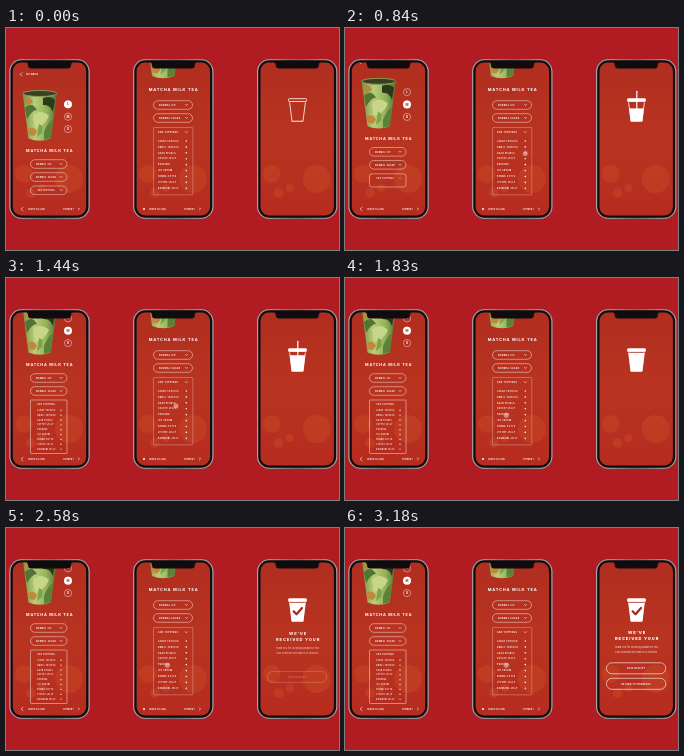
An HTML page for the animation above (3.6 s loop, 333 px wide and 222 px high).

```html
<!DOCTYPE html>
<html lang="en">
<head>
<meta charset="utf-8">
<title>Tea ordering app</title>
<style>
html, body { margin: 0; width: 100%; height: 100%; overflow: hidden; background: #b11c22; }
svg { display: block; width: 100vw; height: 100vh; font-family: Inter, "Open Sans", sans-serif; }
text { fill: #fff; }
.line { fill: none; stroke: #fff; stroke-width: .5; stroke-opacity: .85; }
.thin { stroke-width: .4; stroke-opacity: .65; }
.mark { fill: none; stroke: #fff; stroke-width: .6; stroke-linecap: round; stroke-linejoin: round; }
.anim, .anim * { animation-duration: 3600ms; animation-iteration-count: infinite; animation-timing-function: linear; }

.scroll { animation-name: scroll; }
@keyframes scroll {
  0%, 19.2% { transform: none; animation-timing-function: ease-in-out; }
  29.5%, 100% { transform: translateY(-36px); }
}
.off { animation-name: off; }
@keyframes off { 0%, 8.3% { opacity: 1; } 11.7%, 100% { opacity: 0; } }
.on { animation-name: on; }
@keyframes on { 0%, 8.3% { opacity: 0; } 11.7%, 100% { opacity: 1; } }

.panel { animation-name: panel; }
@keyframes panel {
  0%, 22% { height: 8.6px; rx: 4.3px; }
  24.5% { height: 17px; rx: .6px; }
  30.8% { height: 43px; rx: .6px; }
  34.2%, 100% { height: 53.5px; rx: .6px; }
}
.arrow { animation-name: arrow; }
@keyframes arrow { 0%, 22% { opacity: 1; } 25%, 100% { opacity: 0; } }
.items { animation-name: items; }
@keyframes items { 0%, 32.5% { opacity: 0; } 39%, 100% { opacity: 1; } }

.touch { animation-name: touch; }
@keyframes touch {
  0%, 13% { transform: translate(180.3px, 125.5px); opacity: 0; }
  16.7%, 33.3% { transform: translate(180.3px, 125.5px); opacity: 1; animation-timing-function: ease-in; }
  40% { transform: translate(170px, 128px); opacity: 1; animation-timing-function: ease-out; }
  50%, 100% { transform: translate(161.3px, 137.3px); opacity: 1; }
}

.straw { animation-name: straw; }
@keyframes straw {
  0%, 2.5% { transform: translateY(-26px); opacity: 0; animation-timing-function: ease-out; }
  5% { opacity: 1; }
  14%, 47.5% { transform: none; opacity: 1; animation-timing-function: ease-in; }
  50.8%, 100% { transform: translateY(10px); opacity: 0; }
}
.lid { animation-name: lid; }
@keyframes lid { 0%, 4% { fill-opacity: 0; } 12%, 100% { fill-opacity: 1; } }
.drink { animation-name: drink; }
@keyframes drink {
  0%, 12.5% { transform: translateY(19px); }
  26%, 47.5% { transform: translateY(2.5px); }
  50.8%, 100% { transform: none; }
}
.check { stroke-dasharray: 16; animation-name: check; }
@keyframes check {
  0%, 55% { stroke-dashoffset: 16; opacity: 0; }
  55.1% { stroke-dashoffset: 16; opacity: 1; animation-timing-function: ease-out; }
  61%, 100% { stroke-dashoffset: 0; opacity: 1; }
}
.rise { animation-name: rise; }
@keyframes rise {
  0%, 59% { transform: translateY(12px); opacity: 0; animation-timing-function: ease-out; }
  76%, 100% { transform: none; opacity: 1; }
}
.save { animation-name: save; }
@keyframes save {
  0%, 69% { transform: translateY(13px); opacity: 0; animation-timing-function: ease-out; }
  81%, 100% { transform: none; opacity: 1; }
}
.home { animation-name: home; }
@keyframes home {
  0%, 77% { transform: translateY(13px); opacity: 0; animation-timing-function: ease-out; }
  88.3%, 100% { transform: none; opacity: 1; }
}
</style>
</head>
<body>
<svg id="stage" class="anim" viewBox="0 0 333 222" preserveAspectRatio="none">
  <defs>
    <linearGradient id="glow" x2="0" y2="1">
      <stop offset="0" stop-color="#b02e20"/>
      <stop offset=".5" stop-color="#b93420"/>
      <stop offset="1" stop-color="#b62c20"/>
    </linearGradient>
    <linearGradient id="metal">
      <stop offset="0" stop-color="#a9a3a4"/>
      <stop offset=".5" stop-color="#6f696b"/>
      <stop offset="1" stop-color="#a9a3a4"/>
    </linearGradient>
    <linearGradient id="leaf">
      <stop offset="0" stop-color="#6f9443"/>
      <stop offset=".35" stop-color="#b9cc78"/>
      <stop offset=".7" stop-color="#93b358"/>
      <stop offset="1" stop-color="#4f7034"/>
    </linearGradient>
    <clipPath id="screen"><rect x="6.800" y="34.500" width="73.400" height="153" rx="8.500"/></clipPath>
    <clipPath id="glass"><path d="M283.500 74.500H299.500L297.300 93.500H285.700Z"/></clipPath>
    <g id="cup">
      <path d="M16.500 65L22.500 110.500Q33.500 115 44.800 110.500L51 65Z" fill="url(#leaf)"/>
      <path d="M37 70Q45 67 49 72L47 84Q44 76 37 77Z" fill="#2b3a1c"/>
      <path d="M19 80Q26 73 31 82Q26 82 21 91Z" fill="#4f7434"/>
      <path d="M27 88Q34 80 43 88Q38 99 29 100Z" fill="#c8d68c"/>
      <path d="M38 104Q43 92 47 92L44.800 110L38 112Z" fill="#5b8239"/>
      <path d="M19 70Q24 68 27 74L21 78Z" fill="#b78a3e"/>
      <path d="M22 101Q27 97 31 104L28 108L23 107Z" fill="#c1873c"/>
      <path d="M33 96Q38 97 36 105L31 109Z" fill="#7da24a"/>
      <ellipse cx="33.800" cy="65.500" rx="17" ry="3" fill="#3a3f20" stroke="#8a9a58" stroke-width="1"/>
    </g>
  </defs>
  <rect width="333" height="222" fill="#b11c22"/>
</svg>
<script>
const stage = document.getElementById('stage');
const toppings = ['LARGE TAPIOCA', 'SMALL TAPIOCA', 'AGAR PEARLS', 'COFFEE JELLY', 'PUDDING',
  'ICE CREAM', 'PANNA COTTA', 'LYCHEE JELLY', 'RAINBOW JELLY'];

function add(parent, tag, attrs = {}) {
  const el = document.createElementNS('http://www.w3.org/2000/svg', tag);
  for (const key in attrs) el.setAttribute(key, attrs[key]);
  return parent.appendChild(el);
}

const group = (parent, name = '') => add(parent, 'g', { class: name });

// y is the middle of the capitals
function label(parent, x, y, words, size, gap = 0, weight = 700, anchor = 'start') {
  const shift = anchor === 'middle' ? gap / 2 : 0;
  const el = add(parent, 'text', {
    x: x + shift, y: y + size * .364, 'font-size': size, 'letter-spacing': gap,
    'font-weight': weight, 'text-anchor': anchor
  });
  el.textContent = words;
  return el;
}

const mark = (parent, d, name = '') => add(parent, 'path', { d, class: 'mark ' + name });
const box = (parent, x, y, width, height, rx, name = 'line') =>
  add(parent, 'rect', { x, y, width, height, rx, class: name });
const chevron = (parent, x, y, name) => mark(parent, `M${x - 1} ${y - .5}l1 1l1 -1`, name);

function select(parent, x, y, width, words, size) {
  box(parent, x, y - 4.3, width, 8.6, 4.3);
  label(parent, x + 5.5, y, words, size, .4);
  chevron(parent, x + width - 6, y);
}

function list(parent, x, y, step, size, dotX) {
  toppings.forEach((name, i) => {
    const rowY = y + i * step;
    label(parent, x, rowY, name, size, .4);
    add(parent, 'circle', { cx: dotX, cy: rowY, r: size * .42, fill: '#fff', 'fill-opacity': .85 });
  });
}

function phone(dx) {
  const root = add(stage, 'g', { transform: `translate(${dx} 0)` });
  add(root, 'rect', { x: 3.3, y: 31, width: 80.4, height: 160, rx: 12.5, fill: 'url(#metal)' });
  add(root, 'rect', { x: 4.5, y: 32.2, width: 78, height: 157.6, rx: 11.3, fill: '#100b0c' });
  const view = add(root, 'g', { 'clip-path': 'url(#screen)' });
  add(view, 'rect', { x: 6, y: 34, width: 75, height: 154, fill: 'url(#glow)' });
  for (const [cx, cy, r] of [[18, 146, 9], [63, 151, 14], [36, 160, 4], [25, 165, 5]])
    add(view, 'circle', { cx, cy, r, fill: '#d9702c', 'fill-opacity': .2 });
  const content = add(view, 'g', { transform: `translate(${-dx} 0)` });
  add(root, 'path', { fill: '#100b0c',
    d: 'M20 33.500H67Q65 35 65 37Q65 40.500 61.500 40.500H25.500Q22 40.500 22 37Q22 35 20 33.500Z' });
  return content;
}

function footer(parent, x) {
  label(parent, x, 181, 'ORDER CALLING', 1.8, .2);
  label(parent, x + 35.3, 181, 'PAYMENT', 1.8, .25);
  mark(parent, `M${x + 50.5} 180l1 1l-1 1`);
}

// product page
const first = phone(0);
const page = group(first, 'scroll');
mark(page, 'M15.800 44.700l-1.600 1.600l1.600 1.600');
label(page, 20, 46.3, 'Go Back', 2.5, .3);
add(page, 'use', { href: '#cup' });
['L', 'M', 'S'].forEach((size, i) => {
  const y = 76.3 + i * 12.4;
  add(page, 'circle', { cx: 62, cy: y, r: 3.6, class: 'line' });
  label(page, 62, y, size, 3.2, 0, 700, 'middle');
  if (i === 2) return;
  const fill = group(page, i ? 'on' : 'off');
  add(fill, 'circle', { cx: 62, cy: y, r: 3.9, fill: '#fff' });
  label(fill, 62, y, size, 3.2, 0, 700, 'middle').style.fill = '#a52a20';
});
label(page, 43.3, 122.8, 'MATCHA MILK TEA', 3.8, .75, 700, 'middle');
select(page, 24.5, 136, 36.5, 'NORMAL ICE', 1.9);
select(page, 24.5, 149, 36.5, 'NORMAL SUGAR', 1.9);
box(page, 24.5, 158, 36.5, 8.6, 4.3, 'line panel');
label(page, 31.3, 162.3, 'ADD TOPPINGS', 1.8, .35);
chevron(page, 55, 162.3, 'arrow');
list(group(page, 'items'), 31.3, 168.3, 4.85, 1.65, 55);
footer(first, 22);
mark(first, 'M17 179.200l-1.800 1.800l1.800 1.800');

// toppings page
const second = phone(123.8);
add(second, 'use', { href: '#cup', transform: 'translate(123.5 -62.500)' });
label(second, 167.2, 62, 'MATCHA MILK TEA', 4, .8, 700, 'middle');
select(second, 147.5, 77, 39, 'NORMAL ICE', 2.05);
select(second, 147.5, 90, 39, 'NORMAL SUGAR', 2.05);
box(second, 147.5, 99.5, 39.3, 67.3, .6, 'line thin');
label(second, 152, 104.3, 'ADD TOPPINGS', 2.05, .4);
chevron(second, 180.3, 104.3);
list(second, 152, 113, 5.92, 1.95, 180.3);
footer(second, 143);
add(second, 'circle', { cx: 138, cy: 181, r: 1, fill: '#fff' });
add(group(second, 'touch'), 'circle', { r: 2.3, fill: '#e0bdb6', 'fill-opacity': .65,
  stroke: '#fff', 'stroke-width': .4, 'stroke-opacity': .6 });

// order status page
const third = phone(247.7);
mark(group(third, 'straw'), 'M291.800 63.300V87').style.strokeWidth = 1.2;
const fill = add(third, 'g', { 'clip-path': 'url(#glass)' });
add(fill, 'rect', { x: 282, y: 74.5, width: 19, height: 20, fill: '#fff', class: 'drink' });
mark(third, 'M283.700 74.800L286 93.200H297L299.300 74.800').style.strokeWidth = .8;
add(third, 'rect', { x: 282.4, y: 70.7, width: 18.2, height: 2.8, rx: .8,
  fill: '#fff', stroke: '#fff', 'stroke-width': .8, class: 'lid' });
const tick = mark(third, 'M287.600 83.300L290.500 86.300L296 80', 'check');
tick.style.stroke = '#a8261f';
tick.style.strokeWidth = 2.2;

const thanks = group(third, 'rise');
label(thanks, 291.7, 104.7, 'WE’VE', 4.1, .85, 800, 'middle');
label(thanks, 291.7, 110.7, 'RECEIVED YOUR', 4.1, .85, 800, 'middle');
label(thanks, 291.5, 119, 'Thank you for choosing Bobaveloo Tea,', 2.2, .08, 400, 'middle');
label(thanks, 291.5, 124.3, 'your order will be ready in 10 minutes.', 2.2, .08, 400, 'middle');

function button(name, y, words) {
  const g = group(third, name);
  box(g, 261.4, y - 5.5, 59.4, 11, 5.5).style.strokeWidth = .7;
  label(g, 291, y, words, 2.1, .3, 700, 'middle');
}
button('save', 140.3, 'SAVE RECEIPT');
button('home', 155.8, 'RETURN TO HOMEPAGE');
</script>
</body>
</html>
```
